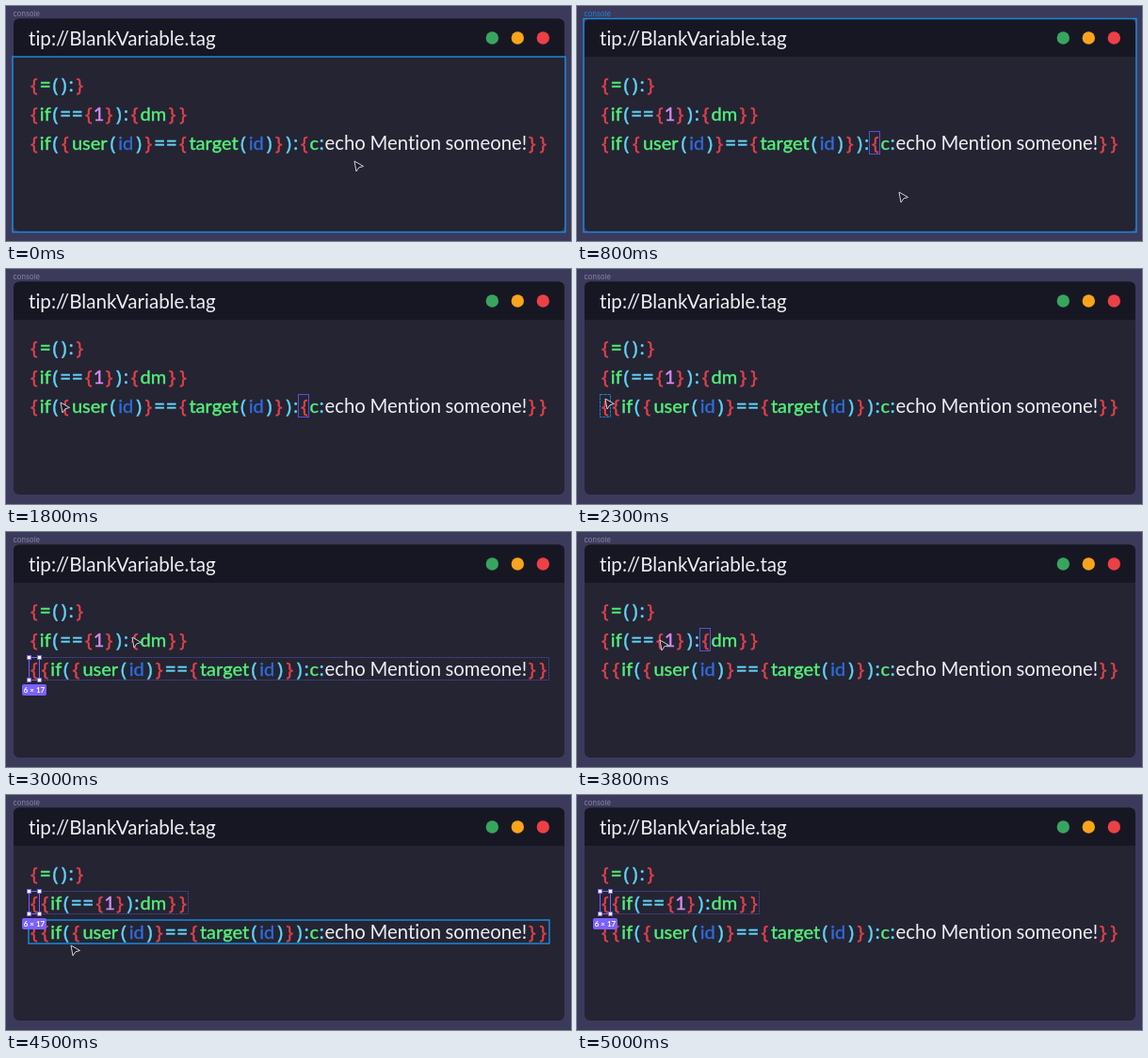
Recreate the animation shown at these times as an HTML page with a canvas. Size 600 px wide and 250 px high, loop 5.5 s.

```html
<!DOCTYPE html>
<html lang="en">
<head>
<meta charset="utf-8">
<title>Console tip</title>
<style>
html, body { margin: 0; width: 600px; height: 250px; overflow: hidden; background: #3b3a5b; }
canvas { display: block; }
</style>
</head>
<body>
<canvas width="600" height="250"></canvas>
<script>
const ctx = document.querySelector("canvas").getContext("2d");
const LOOP = 5500, STEP = 100;
const BLUE = "#1c87d6", PURPLE = "#5752cf", BADGE = "#7b61ff", WHITE = "#eeeef4";
const RED = "#e2414a", GREEN = "#55f07a", CYAN = "#62d3f6", NAVY = "#2d6cdb", PINK = "#d68cf0";
const LATO = 'Lato, "Open Sans", sans-serif', NOTO = '"Noto Sans", "Open Sans", sans-serif';

// Cell widths of symbols and words
const CELL = { "{": 11.5, "}": 11.5, "(": 9, ")": 9, ":": 6.5, "=": 12.5 };
const WORD = { 1: 10.2, c: 9.5, if: 12.5, dm: 28.5, user: 40.5, id: 18.5, target: 54, echo: 48, Mention: 80, "someone!": 86.5 };
const PLAIN = ["echo", "Mention", "someone!"];

const rows = [
  { y: 84, text: "{ = ( ) : }" },
  { y: 115, text: "{ if ( = = { 1 } ) : { dm } }", pick: 10, box: 130.5, right: 193.5, grab: 3200, move: 4000, drop: 4300, end: LOOP },
  { y: 146, text: "{ if ( { user ( id ) } = = { target ( id ) } ) : { c : echo Mention someone! } }",
    pick: 19, box: 310.5, right: 576.5, grab: 200, move: 2000, drop: 2400, end: 3200 }
];

// time, x, y of the pointer tip
const path = [
  [0, 370, 165], [250, 317, 143], [500, 338, 190], [600, 338, 190], [800, 342, 198],
  [1200, 320, 160], [1400, 315, 139], [1800, 58, 142], [2100, 30, 138], [2400, 30, 138],
  [3000, 134, 112], [3300, 135, 110], [3600, 112, 113], [3800, 88, 115], [4100, 30, 108],
  [4300, 30, 110], [4500, 69, 160], [4700, 80, 210], [4900, 88, 262], [LOOP, 88, 262]
];

function pointer(t) {
  const i = path.findIndex(p => p[0] > t);
  const a = path[i - 1], b = path[i], k = (t - a[0]) / (b[0] - a[0]);
  return [a[1] + (b[1] - a[1]) * k, a[2] + (b[2] - a[2]) * k];
}

function text(s, x, y, color, font, align = "left") {
  ctx.font = font;
  ctx.letterSpacing = "0.02px"; // keeps ligatures off
  ctx.textAlign = align;
  ctx.fillStyle = color;
  ctx.fillText(s, x, y);
}

function outline(x, y, right, bottom, color, width = 1, dash = []) {
  ctx.strokeStyle = color;
  ctx.lineWidth = width;
  ctx.setLineDash(dash);
  ctx.strokeRect(x, y, right - x, bottom - y);
  ctx.setLineDash([]);
}

function panel(y, h, color, radii) {
  ctx.fillStyle = color;
  ctx.beginPath();
  ctx.roundRect(8, y, 585, h, radii);
  ctx.fill();
}

function colorOf(s, row, i) {
  if ("{}".includes(s)) return RED;
  if (s === "1") return PINK;
  if (s === "id") return NAVY;
  if (row === rows[0] && i === 1) return GREEN;
  return s in CELL ? CYAN : GREEN;
}

// Coloured tokens are centred in their cells and slightly emboldened.
function drawToken(s, x, y, color) {
  text(s, x, y, color, `20px ${s in CELL ? NOTO : LATO}`, "center");
  ctx.strokeStyle = color;
  ctx.lineWidth = 0.4;
  ctx.strokeText(s, x, y);
}

function drawRow(row, t) {
  const tokens = row.text.split(" ");
  if (t >= row.move) tokens.unshift(...tokens.splice(row.pick, 1));
  let x = 24;
  tokens.forEach((s, i) => {
    const w = CELL[s] || WORD[s];
    if (PLAIN.includes(s)) text(s, x, row.y + 7, WHITE, `20.3px ${LATO}`);
    else drawToken(s, x + w / 2, row.y + 7, colorOf(s, row, i));
    x += w;
  });
}

function drawSelection(row, t) {
  if (!row.grab || t < row.grab || t >= row.end) return;
  const top = row.y - 12.5, bottom = row.y + 11.5;
  if (t < row.drop) {
    const moved = t >= row.move, x = moved ? 24.5 : row.box;
    outline(x, top, x + 11, bottom, moved ? BLUE : PURPLE, 1, moved ? [3, 1] : []);
    return;
  }
  outline(24.5, top, row.right, bottom, "#4b4695", 1, [2, 1]);
  outline(24.5, top, 35.5, bottom, BADGE);
  for (const x of [24.5, 35.5]) for (const y of [top, bottom]) {
    ctx.fillStyle = "#fff";
    ctx.fillRect(x - 2, y - 2, 4, 4);
    outline(x - 2, y - 2, x + 2, y + 2, BADGE, 0.8);
  }
  ctx.fillStyle = BADGE;
  ctx.beginPath();
  ctx.roundRect(17, row.y + 16, 26, 12, 2);
  ctx.fill();
  text("6 × 17", 30, row.y + 25, "#fff", `bold 8px ${LATO}`, "center");
}

function drawPointer(x, y) {
  ctx.beginPath();
  ctx.moveTo(x, y);
  ctx.lineTo(x + 9.5, y + 5.5);
  ctx.lineTo(x + 4.8, y + 6.8);
  ctx.lineTo(x + 2, y + 11);
  ctx.closePath();
  ctx.fillStyle = "#1b1b25";
  ctx.fill();
  ctx.strokeStyle = "#d2d2da";
  ctx.lineWidth = 1;
  ctx.stroke();
}

function draw(t) {
  const framed = t >= 400 && t < 1200;
  ctx.fillStyle = "#3b3a5b";
  ctx.fillRect(0, 0, 600, 250);
  text("console", 7.5, 10.5, framed ? BLUE : "#8987a3", `7.6px Inter, sans-serif`);
  panel(13.5, 226.5, "#242433", 6);
  panel(13.5, 40.5, "#171723", [6, 6, 0, 0]);
  text("tip://BlankVariable.tag", 24, 41.5, WHITE, `20.6px ${LATO}`);
  ["#38a55e", "#faa41c", "#ec4046"].forEach((c, i) => {
    ctx.fillStyle = c;
    ctx.beginPath();
    ctx.arc(516.3 + 27 * i, 34, 6.7, 0, 7);
    ctx.fill();
  });
  rows.forEach(row => drawRow(row, t));

  if (t < 200 || (t >= 4600 && t < 4900)) outline(7, 54, 594, 240.5, BLUE, 1.5);
  if (framed) outline(7, 13.5, 594, 240.5, BLUE, 1.5);
  if (t >= 4400 && t < 4600) outline(24, 133, 577, 158, BLUE, 1.5);
  rows.forEach(row => drawSelection(row, t));
  drawPointer(...pointer(t));
}

function tick() {
  const t = performance.now() % LOOP;
  draw(Math.floor(t / STEP) * STEP);
  requestAnimationFrame(tick);
}
tick();
</script>
</body>
</html>
```
